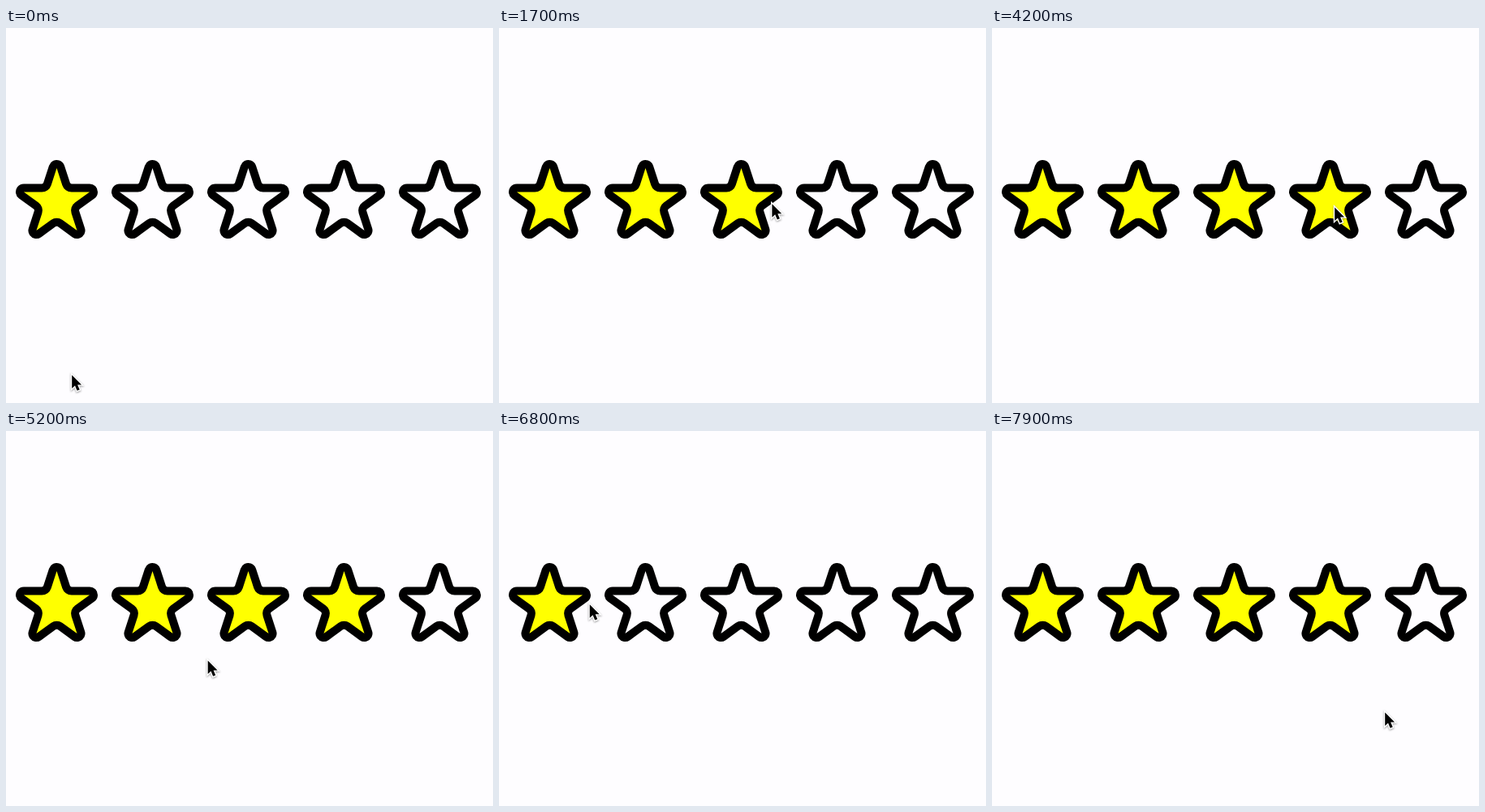
These frames come from a looping animation (600 by 463 pixels, 8 s). An HTML page:

```html
<!DOCTYPE html>
<html lang="en">
<head>
<meta charset="utf-8">
<title>Star rating</title>
<style>
  html, body { margin: 0; width: 100%; height: 100%; overflow: hidden; background: #fefdff; }
  svg { display: block; width: 600px; height: 463px; }
  .star { stroke: #000; stroke-width: 20; stroke-linejoin: round; paint-order: stroke; }
  #cursor { filter: drop-shadow(0 1.5px 1.2px rgba(0, 0, 0, .4)); }
</style>
</head>
<body>
<svg viewBox="0 0 600 463">
  <g id="stars"></g>
  <g id="cursor">
    <path d="M1.2 2.4V19L5 15.5 7.6 21.8 10.7 20.5 8.1 14.4H13.1Z"
      fill="#000" stroke="#fff" stroke-width="2.8" paint-order="stroke"/>
  </g>
</svg>
<script>
const LOOP = 8000, STEP = 100;
const EMPTY = '#fefdff', FULL = '#ff0';
const PITCH = 118, FIRST_X = 62.5, CENTER_Y = 215.6;
const CLICK_TIME = 2400;

// Cursor tip: [time, x, y]
const PATH = [
  [0, 80, 426], [200, 72, 370], [500, 84, 236], [900, 192, 222],
  [1000, 180, 221], [1300, 28, 214], [1800, 412, 215], [1900, 421, 212],
  [2100, 412, 207], [2700, 412, 207], [2800, 412, 235], [3200, 215, 431],
  [3600, 215, 431], [4000, 404, 250], [4200, 421, 219], [4400, 425, 214],
  [4500, 424, 218], [4700, 400, 300], [5000, 205, 340], [5400, 290, 222],
  [5700, 205, 214], [6000, 111, 212], [6200, 225, 217], [6300, 222, 217],
  [6700, 43, 212], [7200, 381, 211], [7400, 313, 212], [7700, 515, 225],
  [7900, 483, 345]
];

// Five sharp tips joined by softly rounded notches
function starPath(radius, round) {
  const point = (r, turn) => {
    const a = (turn * 36 - 90) * Math.PI / 180;
    return [r * Math.cos(a), r * Math.sin(a)];
  };
  const notch = radius * 0.381966;
  const cut = round * Math.tan(Math.PI / 5);
  const toward = ([x, y], [tx, ty]) => {
    const k = cut / Math.hypot(tx - x, ty - y);
    return [x + (tx - x) * k, y + (ty - y) * k];
  };
  const fmt = p => p.map(v => v.toFixed(2)).join(' ');
  let d = '';
  for (let i = 0; i < 10; i += 2) {
    const tip = point(radius, i), inner = point(notch, i + 1), next = point(radius, i + 2);
    d += `${i ? 'L' : 'M'}${fmt(tip)}L${fmt(toward(inner, tip))}` +
      `A${round} ${round} 0 0 0 ${fmt(toward(inner, next))}`;
  }
  return d + 'Z';
}

const shape = starPath(42.6, 12);
const stars = Array.from({ length: 5 }, (_, i) => {
  const star = document.createElementNS('http://www.w3.org/2000/svg', 'path');
  star.setAttribute('class', 'star');
  star.setAttribute('d', shape);
  star.setAttribute('transform', `translate(${FIRST_X + i * PITCH} ${CENTER_Y})`);
  document.getElementById('stars').append(star);
  return star;
});
const cursor = document.getElementById('cursor');

function cursorAt(t) {
  const i = PATH.findIndex(key => key[0] > t);
  if (i < 0) return PATH[PATH.length - 1].slice(1);
  const [t0, x0, y0] = PATH[i - 1], [t1, x1, y1] = PATH[i];
  const k = (t - t0) / (t1 - t0);
  return [x0 + (x1 - x0) * k, y0 + (y1 - y0) * k];
}

// Hovering previews a rating; elsewhere the chosen rating shows
function ratingAt(t, x, y) {
  if (y > 150 && y < 268) return Math.floor((x - FIRST_X) / PITCH + 0.5) + 1;
  return t < CLICK_TIME ? 1 : 4;
}

function render(t) {
  const [x, y] = cursorAt(t);
  const rating = ratingAt(t, x, y);
  stars.forEach((star, i) => star.setAttribute('fill', i < rating ? FULL : EMPTY));
  cursor.setAttribute('transform', `translate(${x} ${y})`);
}

const start = performance.now();
function tick() {
  const t = (performance.now() - start) % LOOP;
  render(Math.floor(t / STEP) * STEP);
  requestAnimationFrame(tick);
}
tick();
</script>
</body>
</html>
```
